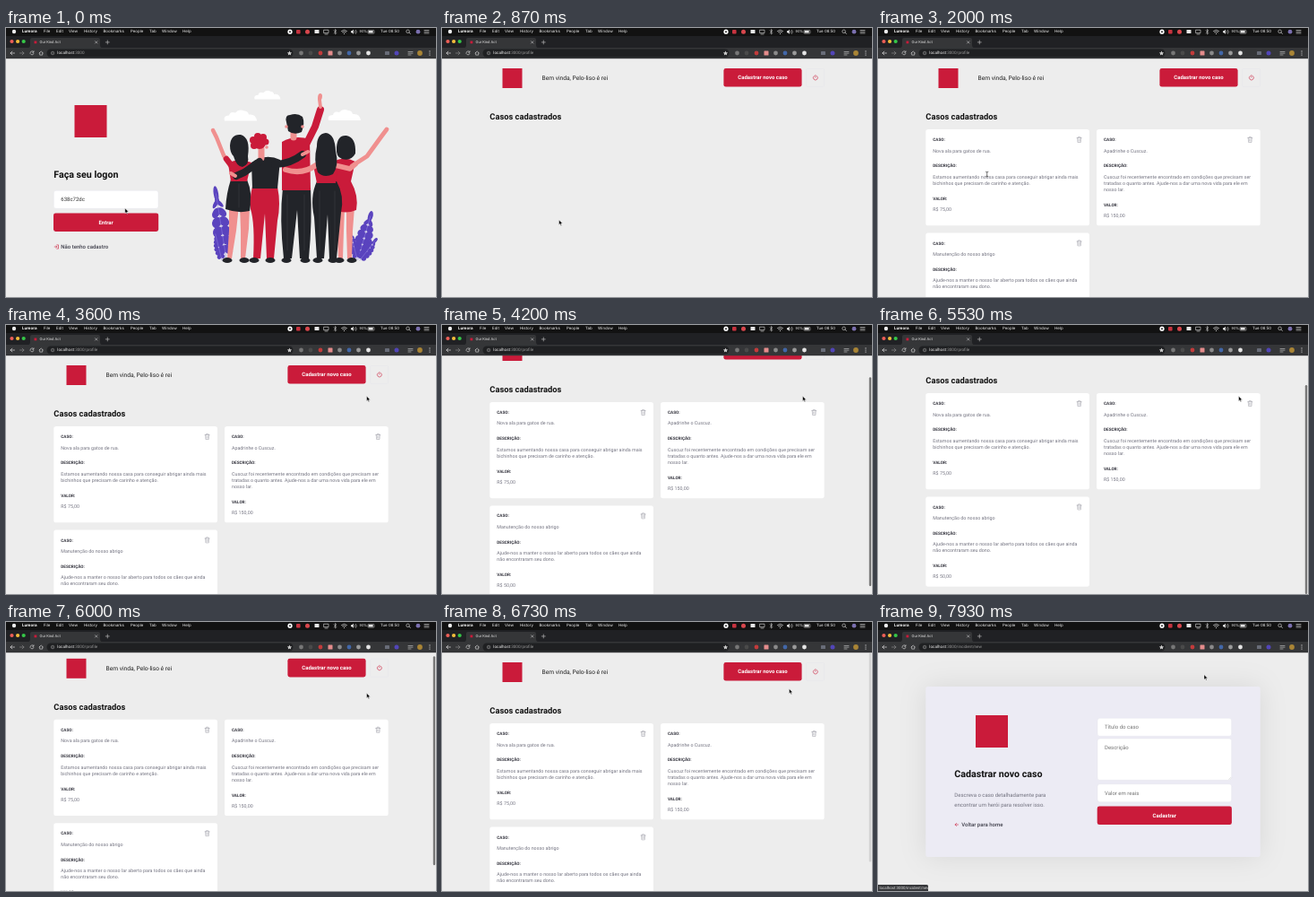
An HTML page for the animation above (8000 ms loop, 480 by 300 pixels).

```html
<!DOCTYPE html>
<html lang="pt-BR">
<head>
<meta charset="utf-8">
<title>Our Kind Act</title>
<style>
html, body { margin: 0; width: 100%; height: 100%; overflow: hidden; background: #ededed; }
svg { display: block; width: 480px; height: 300px; font-family: Roboto, sans-serif; text-rendering: geometricPrecision; }
.bar { font-family: Inter, sans-serif; }
.panel { filter: drop-shadow(0 0 15px rgba(0, 0, 0, .09)); }
</style>
</head>
<body>
<svg id="stage" viewBox="0 0 480 300"></svg>
<script>
const RED = '#ca1b3a', INK = '#222429', SKIN = '#f0908f', PURPLE = '#5a43be', GRAY = '#737380';

// Drawing helpers
const text = (x, y, size, str, fill = GRAY, weight = 400, anchor = 'start') =>
  `<text x="${x}" y="${y}" font-size="${size}" fill="${fill}" font-weight="${weight}" text-anchor="${anchor}">${str}</text>`;
const rect = (x, y, w, h, fill, r = 0, extra = '') =>
  `<rect x="${x}" y="${y}" width="${w}" height="${h}" fill="${fill}" rx="${r}" ${extra}/>`;
const dot = (x, y, r, fill) => `<circle cx="${x}" cy="${y}" r="${r}" fill="${fill}"/>`;
const oval = (x, y, rx, ry, fill, turn = 0) =>
  `<ellipse cx="${x}" cy="${y}" rx="${rx}" ry="${ry}" fill="${fill}" transform="rotate(${turn} ${x} ${y})"/>`;
const shape = (d, fill) => `<path d="${d}" fill="${fill}"/>`;
const line = (d, color, w) =>
  `<path d="${d}" fill="none" stroke="${color}" stroke-width="${w}" stroke-linecap="round" stroke-linejoin="round"/>`;
const group = (id, body) => `<g id="${id}">${body}</g>`;
const button = (id, x, y, w, label) =>
  rect(x, y, w, 20.6, RED, 2.4, `id="${id}"`) + text(x + w / 2, y + 12.3, 6, label, '#fff', 700, 'middle');
const field = (x, y, w, h, label, fill = '#757575') =>
  rect(x, y, w, h, '#fff', 2.67, 'stroke="#dcdce6" stroke-width=".33"') + text(x + 8, y + 12.1, 6, label, fill);

function browser() {
  const menu = [[42, 'File'], [56, 'Edit'], [70, 'View'], [87, 'History'], [108.5, 'Bookmarks'],
    [139, 'People'], [160, 'Tab'], [174, 'Window'], [197, 'Help']];
  const extensions = [[329.5, '#777'], [340, '#4a4a4a'], [351, '#c23b3b'], [372.5, '#8a8a8a'],
    [383, '#4267a8'], [393.5, '#9a9a9a'], [404.5, '#e5e5e5']];
  const light = '#e4e4e4';
  return rect(0, 0, 480, 9, '#121212') + rect(0, 9, 480, 13.5, '#202124') + rect(0, 22, 480, 12.2, '#353638') +
    '<g class="bar">' + dot(9, 4, 2.2, '#eee') + text(18, 5.4, 4.5, 'Lumora', '#fff', 700) +
    menu.map(([x, s]) => text(x, 5.4, 4.4, s, '#f2f2f2')).join('') +
    text(394.5, 5.2, 3.9, '90%', '#f2f2f2') + text(418, 5.4, 4.4, 'Tue 08:50', '#f2f2f2') + '</g>' +
    dot(317, 4.2, 2.6, '#fff') + dot(317, 4.2, 1, '#222') +
    rect(324, 2, 4.6, 4.6, '#c7333f', 1) + dot(336.5, 4.3, 2.5, '#d8474d') +
    rect(344.5, 2, 5, 4, '#e8e8e8', .6) + line('M355 2.2h5v3.4h-5zM356 7h3', light, .6) +
    line('M366 2.6l3 3-1.5 1.4v-5.6l1.5 1.4-3 3', light, .5) +
    line('M374.5 3.4q3-2.5 6 0M375.6 4.8q1.9-1.5 3.8 0', light, .7) + dot(377.5, 6.3, .6, light) +
    shape('M385 3.3h1.2l1.7-1.5v5l-1.7-1.5H385z', light) + line('M389.3 3q1.2 1.3 0 2.6M390.6 2.2q2 2 0 4.2', light, .5) +
    rect(404, 2.4, 7, 3.7, 'none', .7, 'stroke="#ddd" stroke-width=".5"') + rect(404.7, 3.1, 5, 2.3, '#eee') +
    line('M450 5l1.5 1.6', light, .6) + rect(446.8, 2, 3.6, 3.6, 'none', 1.8, 'stroke="#e4e4e4" stroke-width=".6"') +
    dot(460, 4.2, 2.4, '#7a6fae') + line('M467 2.5h5M467 4.2h5M467 5.9h5', light, .6) +
    // tab strip
    ['#ee5f57', '#f4bd3b', '#35c748'].map((c, i) => dot(6.5 + 6.6 * i, 15, 2.1, c)).join('') +
    shape('M25 22.5Q27 22 27 19V13q0-2 2-2h74q2 0 2 2v6q0 3 2 3.5z', '#353638') +
    rect(31.5, 14.5, 2.8, 2.8, RED) + text(37.5, 17.3, 4.2, 'Our Kind Act', '#ddd') +
    line('M99.5 14.7l2.4 2.4m0-2.4l-2.4 2.4M111.3 15.9h4m-2-2v4', '#ccc', .6) +
    // toolbar
    rect(45.5, 23.5, 275, 9, '#1f2022', 4.5) +
    line('M9.5 28H5m1.9-1.9L5 28l1.9 1.9', '#ddd', .7) + line('M15.5 28H20m-1.9-1.9L20 28l-1.9 1.9', '#888', .7) +
    line('M30.7 26.7a2 2 0 1 0 .3 1.7M31 25.7v1.5h-1.5', '#ddd', .6) +
    line('M37 28l2.2-2 2.2 2M37.7 27.6v2.5h3v-2.5', '#ddd', .6) +
    rect(50.3, 26.2, 3.6, 3.6, 'none', 1.8, 'stroke="#aaa" stroke-width=".5"') + line('M52.1 28v.8M52.1 27.1v.1', '#aaa', .5) +
    `<text x="57.3" y="29.4" font-size="4.6" fill="#eee">localhost<tspan id="path" fill="#999"></tspan></text>` +
    shape('M316.5 25.4l.8 1.8 1.9.2-1.4 1.3.4 1.9-1.7-1-1.7 1 .4-1.9-1.4-1.3 1.9-.2z', '#ccc') +
    extensions.map(([x, c]) => dot(x, 28, 2.4, c)).join('') + rect(359.5, 25.5, 5, 5, '#e58c8c', .6) +
    rect(423, 26, 5, 4, '#686c78', .6) + dot(436, 28, 2.5, '#5245b8') +
    line('M449 26.5h5M449 28.2h5M449 30h3', '#ccc', .6) + dot(462, 28, 2.9, '#a98435') +
    [25.9, 28, 30.1].map(y => dot(473, y, .6, '#ddd')).join('');
}

// A stem with paired leaflets, shrinking toward the tip
function frond(x, y, turn, len, w) {
  let leaves = oval(0, -len, w * .3, len * .12, PURPLE);
  for (let i = 1; i < 7; i++) {
    const k = w * Math.sin(.5 + i * .37), at = -len * i / 7;
    leaves += oval(k / 2, at, k * .6, len * .085, PURPLE, -38) + oval(-k / 2, at, k * .6, len * .085, PURPLE, 38);
  }
  return `<g transform="translate(${x} ${y}) rotate(${turn})">${leaves}${line(`M0 0V${-len}`, '#8f7fe0', .5)}</g>`;
}

function friends() {
  const cloud = (x, y, k) => `<path transform="translate(${x} ${y}) scale(${k})" fill="#fff"
    d="M-18 5q-2-6 5-6 1-5 7-3 4-5 10-2 4 0 5 4 8-1 9 7z"/>`;
  const shoes = [249, 264, 279, 293, 315, 332, 350, 363, 374, 384];
  return cloud(262, 98.5, 1) + cloud(292, 75.5, .8) + cloud(378, 98, 1) +
    frond(246, 258, -9, 74, 9) + frond(241, 259, -14, 30, 5) +
    frond(393, 258, 16, 50, 9) + frond(395, 259, 38, 28, 6) + frond(392, 258, -14, 30, 5) +
    // woman on the left
    shape('M249 198H260L257 226L252 257H247L249 226zM261 198H272L271 224L267 257H262L262 226z', SKIN) +
    shape('M251 169H269Q276 185 272 204Q259 207 245 202Q246 184 251 169z', INK) +
    line('M251 155L243 142L235 122L231 114', SKIN, 4.5) + line('M253 155L246 146', RED, 6.5) +
    shape('M248 151Q259 144 274 150L269 171H251z', RED) +
    // red-haired friend
    shape('M275 177H303Q307 196 303 215L299 257H291L289 207L284 257H276Q278 218 273 202Q272 188 275 177z', RED) +
    shape('M274 150Q290 139 306 147L303 179H275z', INK) +
    line('M285 135V145', SKIN, 7) + [[283, 128, 7], [276, 125, 4], [281, 121, 4], [287, 122, 4], [290, 127, 3.5], [277, 131, 4]]
      .map(([x, y, r]) => dot(x, y, r, RED)).join('') + dot(291, 133, 1.8, SKIN) +
    // tall man
    shape('M309 178H340Q342 215 338 257H328L325 203L319 257H310Q305 212 309 178z', INK) +
    line('M335 130L345 110L351 91', RED, 8) + line('M351 88L350 80', SKIN, 3.8) + oval(350.5, 77, 2.4, 4, SKIN, 8) +
    shape('M308 127Q322 119 339 124L340 181H308z', RED) + line('M321 113V122', SKIN, 7) +
    shape('M313 105Q311 97 317 97Q325 94 331 99Q334 106 330 116Q322 120 315 115z', INK) +
    dot(313, 110, 1.8, SKIN) + dot(331, 110, 1.8, SKIN) +
    // arms around shoulders
    line('M300 152Q317 152 331 141', INK, 8) + line('M331 141L337 138', SKIN, 4) +
    line('M283 149L266 161L257 165', INK, 8) + line('M256 165L251 162', SKIN, 4) +
    // woman on the right
    shape('M370 200H378L377 226L376 257H371L370 226zM380 200H389L387 226L386 257H381L380 226z', SKIN) +
    shape('M365 149Q378 142 390 149L385 171Q394 187 391 203Q379 208 367 203z', RED) +
    line('M386 154L403 143L419 121L425 113', SKIN, 4.8) +
    shape('M369 133Q370 119 380 120Q391 122 390 140Q385 149 375 146Q368 144 369 133z', INK) +
    // long-haired woman
    shape('M347 171H369Q378 187 374 206L369 257H361L359 208L355 257H347L344 211Q339 188 347 171z', INK) +
    shape('M343 153Q356 145 371 151L368 173H347z', RED) +
    line('M346 153Q331 164 312 158', SKIN, 6) + line('M367 153L384 157L390 152', SKIN, 5.5) +
    shape('M347 132Q347 118 357 117Q367 118 368 137Q372 153 365 163Q355 168 348 161Q343 148 347 132z', INK) +
    shape('M262 119Q251 118 250 131Q250 139 254 143Q257 154 264 155Q272 152 270 143Q273 122 262 119z', INK) +
    line('M260 174V200M314 186V248M333 186V248M350 182V248M367 182V248', '#4a4c53', .4) +
    shoes.map((x, i) => oval(x + (i % 2 ? 2 : -2), 259, 5.5, 3, INK)).join('');
}

const logon = () =>
  rect(76.5, 86, 36, 36, RED) + text(53.3, 167, 10.67, 'Faça seu logon', '#111', 700) +
  field(53.3, 181.3, 116.7, 20, '638c72dc', '#333') + button('enter', 53, 206.4, 117.2, 'Entrar') +
  line('M56.8 241.9h1.7v4.2h-1.7M54.2 244h2.6m-1-1l1 1-1 1', RED, .6) +
  text(61.3, 246, 6, 'Não tenho cadastro', '#41414d', 500) + friends();

function card(x, y, h, title, lines, value) {
  const label = (dy, s) => text(x + 8, y + dy, 4.67, s, '#33333d', 700);
  const body = (dy, s) => text(x + 8, y + dy, 5.33, s);
  const end = 7 * (lines.length - 2);
  return rect(x, y, 182.7, h, '#fff', 2.67) + label(13.1, 'CASO:') + body(25.5, title) +
    label(42.3, 'DESCRIÇÃO:') + lines.map((s, i) => body(54.9 + 7 * i, s)).join('') +
    label(78.8 + end, 'VALOR:') + body(91 + end, value) +
    line(`M${x + 168.7} ${y + 9.6}h5.2m-4.6 0l.3 4.9h3.4l.3-4.9m-3.1 0v-1.2h2.2v1.2m-1.8 1.5v2m1.4-2v2`, '#a0a0aa', .55);
}

const cards = () =>
  card(53.3, 113, 107.3, 'Nova ala para gatos de rua.',
    ['Estamos aumentando nossa casa para conseguir abrigar ainda mais',
      'bichinhos que precisam de carinho e atenção.'], 'R$ 75,00') +
  card(244, 113, 107.3, 'Apadrinhe o Cuscuz.',
    ['Cuscuz foi recentemente encontrado em condições que precisam ser',
      'tratadas o quanto antes. Ajude-nos a dar uma nova vida para ele em', 'nosso lar.'], 'R$ 150,00') +
  card(53.3, 228.4, 100.3, 'Manutenção do nosso abrigo',
    ['Ajude-nos a manter o nosso lar aberto para todos os cães que ainda',
      'não encontraram seu dono.'], 'R$ 50,00');

const profile = () =>
  rect(67.5, 45, 22, 22, RED) + text(111.5, 58, 6.67, 'Bem vinda, Pelo-liso é rei', '#222') +
  button('create', 314.4, 45, 87.2, 'Cadastrar novo caso') +
  rect(406.7, 45.5, 20, 20, 'none', 1.33, 'stroke="#e1e1e8" stroke-width=".33"') +
  line('M415.2 53.6a2.5 2.5 0 1 0 3.4 0M416.9 52.5v2.5', RED, .6) +
  text(53.3, 102.1, 9.33, 'Casos cadastrados', '#111', 700) + group('cards', cards());

const form = () =>
  rect(53.3, 72, 373.4, 190, '#ecebf4', 2.67, 'class="panel"') + rect(109, 104, 36, 36, RED) +
  text(85.3, 173.4, 10.67, 'Cadastrar novo caso', '#111', 700) +
  text(85.3, 195.1, 6, 'Descreva o caso detalhadamente para') +
  text(85.3, 205.8, 6, 'encontrar um herói para resolver isso.') +
  line('M89.5 226h-3.4m1.6-1.6l-1.6 1.6 1.6 1.6', RED, .6) +
  text(93.3, 228.1, 6, 'Voltar para home', '#41414d', 500) +
  field(245, 107.3, 149.7, 20, 'Título do caso') + field(245, 130, 149.7, 46.3, 'Descrição') +
  line('M391.8 175.4l2-2M393.2 175.4l.6-.6', '#999', .3) +
  field(245, 180.7, 149.7, 20, 'Valor em reais') + button('save', 244.7, 205.5, 150.2, 'Cadastrar');

const stage = document.getElementById('stage');
stage.innerHTML = rect(0, 0, 480, 300, '#ededed') +
  group('logon', logon()) + group('profile', profile()) + group('form', form()) +
  rect(476.8, 0, 2.4, 233, '#777', 1.2, 'id="thumb"') +
  group('status', rect(-2, 293, 58, 9, '#37383b', 1.5) + text(1.5, 298.2, 4.4, 'localhost:3000/incident/new', '#ddd')) +
  browser() +
  group('arrow', '<path d="M0 0V5.6L1.3 4.4L2.2 6.4L3.1 6L2.2 4.1H4z" fill="#000" stroke="#fff" stroke-width=".45"/>') +
  group('beam', line('M-1.2 -2.8Q0 -2.8 0 -2V2Q0 2.8 -1.2 2.8M1.2 -2.8Q0 -2.8 0 -2M0 2Q0 2.8 1.2 2.8', '#222', .6));

const el = id => document.getElementById(id);
const parts = Object.fromEntries(['logon', 'profile', 'form', 'cards', 'thumb', 'status', 'path',
  'arrow', 'beam', 'enter', 'create'].map(id => [id, el(id)]));

// Keys are [time, ...values]
const pointer = [[70, 132.8, 201], [450, 130.5, 214], [1140, 130.5, 214], [1530, 124, 170], [1610, 124, 170],
  [1950, 121.7, 163], [2050, 121.7, 163], [2220, 99, 178], [2470, 198, 204], [2870, 331, 233], [3020, 331, 233],
  [3400, 404, 77], [3540, 404, 77], [3600, 402.6, 79.3], [6330, 402.6, 79.3], [6930, 380, 72],
  [7010, 380, 72], [7470, 364, 58.7]];
const scroll = [[3740, 0], [3900, 7], [4200, 27], [4400, 30], [4610, 30], [5270, 37], [5530, 37], [6000, 4.2], [6270, 0]];

function track(keys, t) {
  const next = keys.findIndex(k => k[0] > t);
  if (next === 0) return keys[0].slice(1);
  if (next < 0) return keys.at(-1).slice(1);
  const a = keys[next - 1], b = keys[next], u = (t - a[0]) / (b[0] - a[0]);
  return a.slice(1).map((v, i) => v + (b[i + 1] - v) * u);
}
const ramp = (t, from, to) => Math.min(1, Math.max(0, (t - from) / (to - from)));
const show = (node, on) => node.setAttribute('visibility', on ? 'visible' : 'hidden');
const hover = (node, u) => node.style.filter = `brightness(${1 - .1 * u})`;

function render(t) {
  const page = t < 870 ? 'logon' : t < 7870 ? 'profile' : 'form';
  for (const id of ['logon', 'profile', 'form']) parts[id].style.display = id === page ? '' : 'none';
  show(parts.cards, t >= 930);
  parts.path.textContent = ':3000' + { logon: '', profile: '/profile', form: '/incident/new' }[page];

  const [y] = track(scroll, t);
  parts.profile.setAttribute('transform', `translate(0 ${-y})`);
  parts.thumb.setAttribute('y', 34.5 + .88 * y);
  parts.thumb.setAttribute('opacity', t < 3760 ? 0 : 1 - ramp(t, 6500, 6800));

  hover(parts.enter, ramp(t, 250, 450));
  hover(parts.create, ramp(t, 7130, 7330));
  show(parts.status, t >= 7270);

  const at = `translate(${track(pointer, t).join(' ')})`, overText = t > 1800 && t < 2100;
  for (const id of ['arrow', 'beam']) parts[id].setAttribute('transform', at);
  show(parts.arrow, !overText);
  show(parts.beam, overText);
}

const start = performance.now();
function tick() {
  render((performance.now() - start) % 8000);
  requestAnimationFrame(tick);
}
tick();
</script>
</body>
</html>
```
